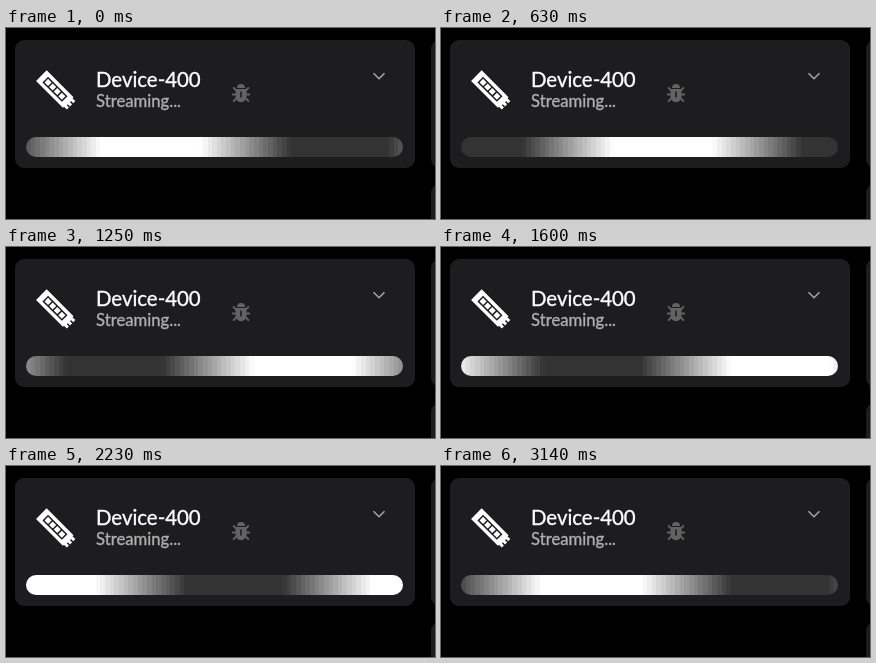
An HTML page with a canvas that plays this animation: 429x191 px, repeating every 3.22 s.

```html
<!DOCTYPE html>
<html lang="en">
<head>
<meta charset="utf-8">
<title>Streaming device</title>
<style>
  html, body { margin: 0; width: 100%; height: 100%; overflow: hidden; background: #000; }
  svg { display: block; }
  text { font-family: Lato, sans-serif; stroke-width: 0.35px; }
  canvas { position: absolute; left: 20px; top: 109px; border-radius: 10px; }
</style>
</head>
<body>
<svg width="429" height="191" viewBox="0 0 429 191">
  <g fill="#1d1d1f">
    <rect x="9" y="12" width="400" height="128" rx="9"/>
    <rect x="425" y="12" width="400" height="128" rx="9"/>
    <rect x="425" y="156" width="400" height="128" rx="9"/>
  </g>

  <g transform="translate(49.5 61.8) rotate(45)" fill="#fff">
    <path d="M-20-7.5H18V-6H22V-3H19V-1.5H22V1.5H19V3H22V6H18V7.5H-20Z"/>
    <rect x="-14.5" y="-4" width="27.5" height="8" fill="#1d1d1f"/>
    <path d="M-13-2.5h5v5h-5zM-6.5-2.5h5v5h-5zM0-2.5h5v5h-5zM6.5-2.5h5v5h-5z"/>
  </g>

  <text x="90" y="58.5" font-size="20.4" fill="#fff" stroke="#fff">Device-400</text>
  <text x="90" y="79" font-size="16.7" fill="#b0b0b0" stroke="#b0b0b0">Streaming...</text>

  <g transform="translate(235 65.5)" fill="#636363">
    <path d="M-4-5.5A4 4 0 0 1 4-5.5Z"/>
    <path d="M-5.5-4.5H5.5V3A5.5 5.8 0 0 1-5.5 3Z"/>
    <path d="M-7.3-5.5L-5-3.2M7.3-5.5L5-3.2M-8.2 1H8.2M-7.3 7.5L-4.5 4.7M7.3 7.5L4.5 4.7"
      fill="none" stroke="#636363" stroke-width="1.9" stroke-linecap="round"/>
    <path d="M-.8-2H.8V4H-.8Z" fill="#1d1d1f"/>
  </g>

  <path d="M367.5 45.2L373 50.7L378.5 45.2" fill="none" stroke="#a4a4a4" stroke-width="1.6"/>
</svg>
<canvas id="strip" width="377" height="20"></canvas>

<script>
const LOOP = 3220, WIDTH = 377, CELLS = 81, SPEED = 0.0262;
const CENTER = 26.8, LIT_HALF = 30.2, RAMP = 19.6;
const updates = [0, 70, 210, 350, 490, 630, 700, 840, 910, 1040, 1110, 1250, 1390, 1460,
  1600, 1670, 1810, 1950, 2020, 2160, 2230, 2370, 2510, 2580, 2720, 2790, 2930, 3000, 3140];
const ctx = document.getElementById("strip").getContext("2d");
const edge = i => Math.round(i * WIDTH / CELLS);

function drawStrip(time) {
  const center = CENTER + SPEED * time;
  for (let i = 0; i < CELLS; i++) {
    const gap = (i + 0.5 - center) / CELLS;
    const distance = Math.abs(gap - Math.round(gap)) * CELLS;
    const level = Math.min(1, Math.max(0, (LIT_HALF - distance) / RAMP));
    const gray = Math.round(51 + 204 * level);
    ctx.fillStyle = `rgb(${gray},${gray},${gray})`;
    ctx.fillRect(edge(i), 0, edge(i + 1) - edge(i), 20);
  }
}

function frame() {
  const time = performance.now() % LOOP;
  drawStrip(updates.findLast(t => t <= time));
  requestAnimationFrame(frame);
}
frame();
</script>
</body>
</html>
```
